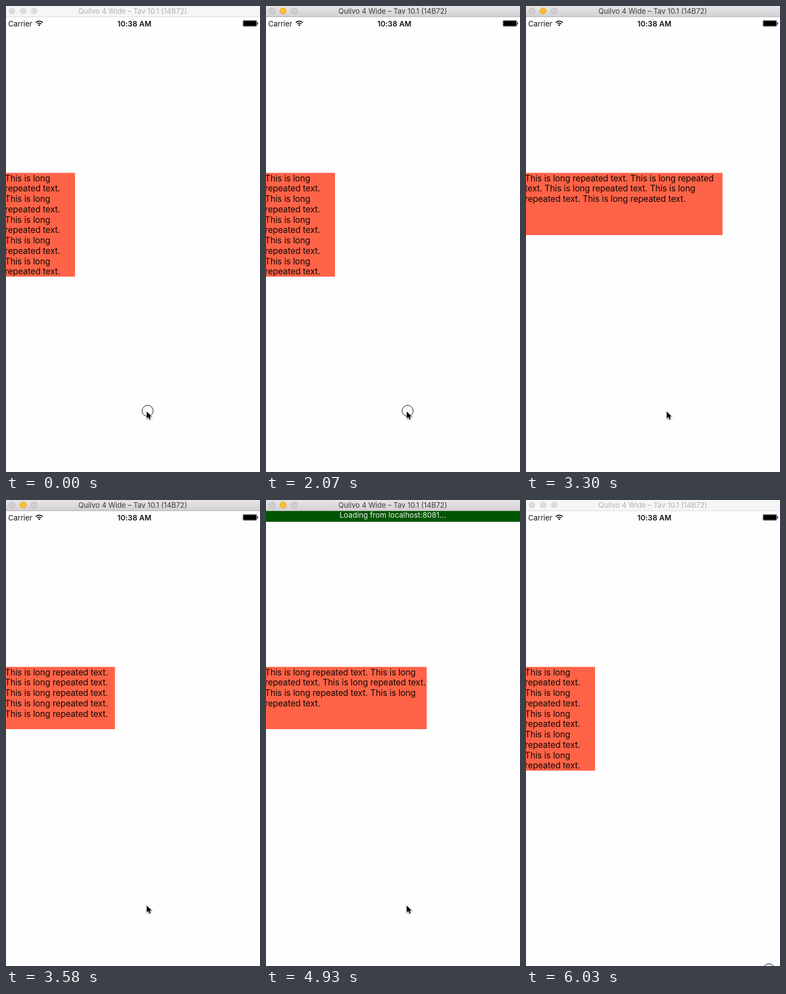
Animation of 460 by 842 pixels, one loop 6.13 s. Source, as an HTML page with a canvas:

```html
<!DOCTYPE html>
<html lang="en">
<head>
<meta charset="utf-8">
<title>Text box resize</title>
<style>
html, body { margin: 0; width: 100%; height: 100%; overflow: hidden; background: #fefefe; }
canvas { display: block; width: 460px; height: 842px; }
</style>
</head>
<body>
<canvas id="stage" width="460" height="842"></canvas>
<script>
const ctx = document.getElementById('stage').getContext('2d');
const W = 460, H = 842, LOOP = 6130;
const STEP = 57.5;
const SHRINK = 913, SLIDE = 250;
const WIDE = 461, NARROW = 125;
const TOP = 301.5, LINE = 18.75, LEFT = -2;
const FONT = 'Inter, "Open Sans", sans-serif';
const WORDS = 'This is long repeated text. '.repeat(5).trim().split(' ');

// "grow" is when the box shows up, "hide" when the banner leaves, relative to it
const RELOADS = [
  { start: 2370, grow: 2950, hide: -25, progress: true },
  { start: 4290, grow: 4470, hide: 382, progress: false }
];

const clamp = v => Math.max(0, Math.min(1, v));
const ease = v => (1 - Math.cos(Math.PI * clamp(v))) / 2;
const mix = (a, b, v) => a + (b - a) * v;
const within = (t, a, b) => t >= a && t < b;
const stepped = t => Math.floor((t + 4) / STEP) * STEP;

function rect(x, y, w, h, color) {
  ctx.fillStyle = color;
  ctx.fillRect(x, y, w, h);
}

function disc(x, y, r, fill, stroke) {
  ctx.beginPath();
  ctx.arc(x, y, r, 0, Math.PI * 2);
  if (fill) { ctx.fillStyle = fill; ctx.fill(); }
  if (stroke) { ctx.strokeStyle = stroke; ctx.lineWidth = 1; ctx.stroke(); }
}

function setFont(size, weight = 400, spacing = 0) {
  ctx.font = `${weight} ${size}px ${FONT}`;
  ctx.letterSpacing = spacing + 'px';
}

function label(text, x, y, color, align = 'left') {
  ctx.fillStyle = color;
  ctx.textAlign = align;
  ctx.fillText(text, x, y);
}

function wrap(width) {
  const lines = [];
  let line = '';
  for (const word of WORDS) {
    const next = line ? line + ' ' + word : word;
    if (line && ctx.measureText(next).width > width) {
      lines.push(line);
      line = word;
    } else {
      line = next;
    }
  }
  return lines.concat(line);
}

function drawBox(width) {
  setFont(15.5, 400, -0.11);
  const lines = wrap(width - LEFT);
  rect(0, TOP, width, Math.max(6, lines.length) * LINE, '#ff6347');
  lines.forEach((text, i) => label(text, LEFT, TOP + 15 + i * LINE, '#120705'));
}

function drawStatus() {
  setFont(13.3);
  label('Carrier', 4, 36.5, '#111');
  setFont(13.3, 600, 0.1);
  label('10:38 AM', 232.5, 36.5, '#111', 'center');

  ctx.strokeStyle = '#000';
  ctx.lineWidth = 1.7;
  for (const r of [5, 8.6]) {
    ctx.beginPath();
    ctx.arc(60.3, 36, r, -Math.PI * 0.76, -Math.PI * 0.24);
    ctx.stroke();
  }
  ctx.beginPath();
  ctx.moveTo(60.3, 36.5);
  ctx.arc(60.3, 36, 2.6, -Math.PI * 0.78, -Math.PI * 0.22);
  ctx.fillStyle = '#000';
  ctx.fill();

  ctx.lineWidth = 0.8;
  ctx.beginPath();
  ctx.roundRect(429.4, 26.4, 24.6, 10.2, 1.6);
  ctx.stroke();
  rect(430.2, 27.2, 23, 8.6, '#000');
  rect(454.8, 29.5, 1.4, 4, '#000');
}

function drawBanner(text, up) {
  rect(0, 20 - up, W, 25, '#005500');
  setFont(13.5);
  label(text, 229.5, 37.5 - up, '#eef5ee', 'center');
}

function drawTitle(active) {
  const shade = ctx.createLinearGradient(0, 0, 0, 19);
  shade.addColorStop(0, active ? '#e8e6e8' : '#f6f6f6');
  shade.addColorStop(1, active ? '#d2d0d2' : '#f6f6f6');
  rect(0, 0, W, 19, shade);
  rect(0, 19, W, 1, active ? '#b4b2b4' : '#dadada');
  [11, 31, 51].forEach((x, i) => {
    if (!active) disc(x, 9, 6, '#dcdcdc');
    else if (i === 1) disc(x, 9, 5.7, '#fdbe2f', '#e5a72a');
    else disc(x, 9, 5.6, '#d0ced0', '#b9b7b9');
  });
  setFont(13);
  label('Quilvo 4 Wide – Tav 10.1 (14B72)', 229.5, 14, active ? '#3c3b3c' : '#b0b0b0', 'center');
}

function drawCursor(x, y, pressed) {
  if (pressed) disc(x, y, 10, null, '#000');
  ctx.save();
  ctx.translate(x - 1.7, y + 1.2);
  ctx.scale(0.88, 0.88);
  ctx.beginPath();
  [[0, 0], [0, 14.2], [3.3, 11.2], [5.6, 16.2], [8.2, 15], [6, 10.2], [10.4, 10.2]]
    .forEach(p => ctx.lineTo(...p));
  ctx.closePath();
  ctx.shadowColor = 'rgba(0,0,0,0.4)';
  ctx.shadowBlur = 2;
  ctx.shadowOffsetY = 1;
  ctx.lineWidth = 2;
  ctx.strokeStyle = '#fff';
  ctx.stroke();
  ctx.shadowColor = 'transparent';
  ctx.fillStyle = '#000';
  ctx.fill();
  ctx.restore();
}

function bannerText(reload, t) {
  const part = Math.min(6, Math.floor((t - reload.start + 2) / 68.5));
  if (!reload.progress || part < 1) return 'Loading from localhost:8081...';
  const done = Math.floor(454 * part / 6);
  return `Loading ${Math.floor(done / 4.54)}% (${done}/454)...`;
}

function draw(t) {
  rect(0, 0, W, H, '#fefefe');
  drawStatus();

  const reload = RELOADS.filter(r => t >= r.start).pop();
  if (!reload) {
    drawBox(NARROW);
  } else {
    const shown = t >= reload.grow;
    const age = stepped(t - reload.grow);
    if (shown) drawBox(mix(WIDE, NARROW, ease(age / SHRINK)));
    const up = shown ? 25 * ease((age - reload.hide) / SLIDE) : 0;
    if (up < 25) drawBanner(bannerText(reload, t), up);
  }

  drawTitle(within(t, 2070, 6030));

  const away = ease((stepped(t - 5400) + 10) / 240);
  const pressed = t < 60 || within(t, 330, 510) || within(t, 2070, 2190) || t >= 6030;
  drawCursor(mix(256.5, 440, away), mix(731.5, 848, away), pressed);
}

function tick() {
  draw(performance.now() % LOOP);
  requestAnimationFrame(tick);
}
tick();
</script>
</body>
</html>
```
